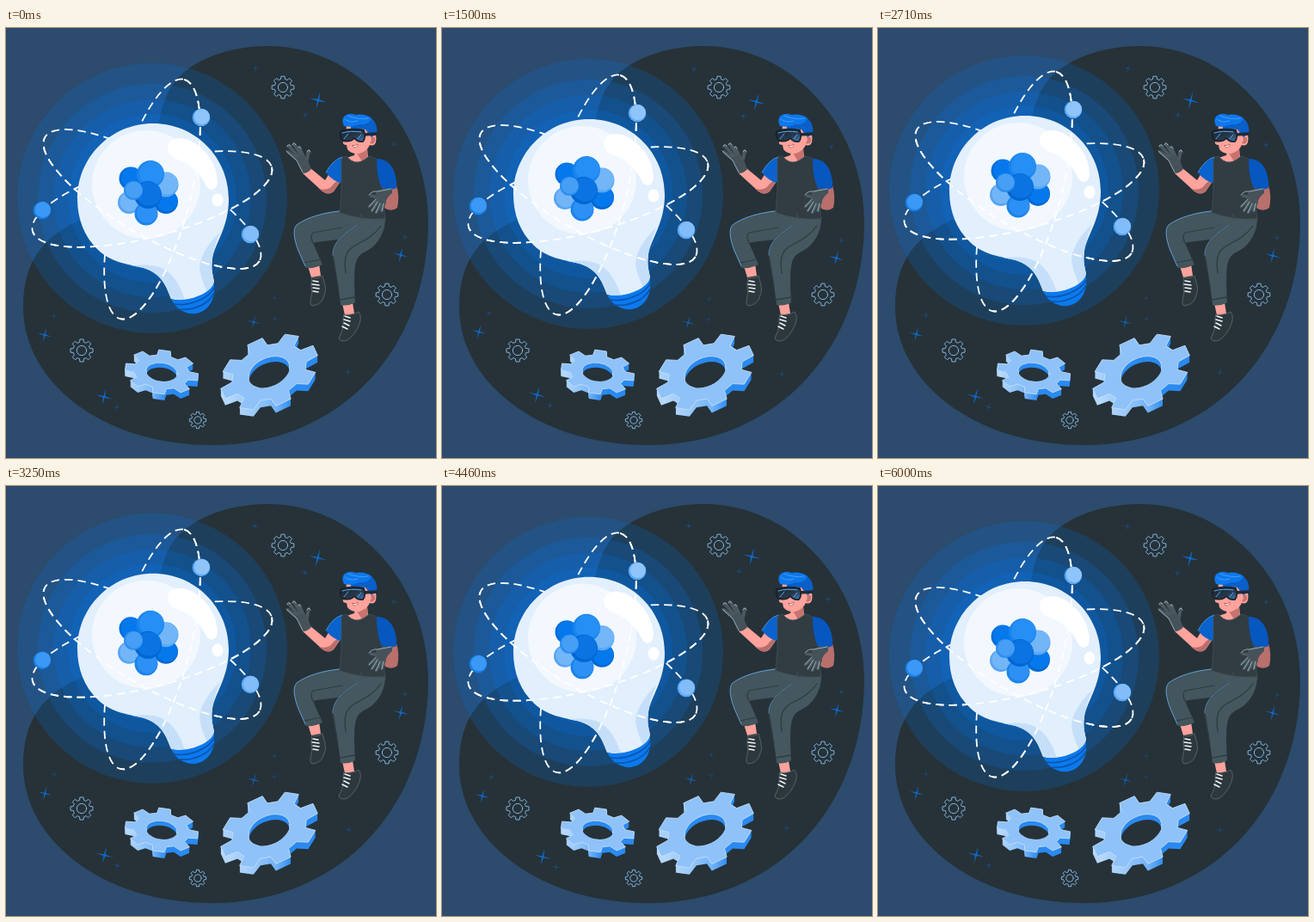
An HTML page for the animation above (6.04 s loop, 500 by 500 pixels).

```html
<!DOCTYPE html>
<html lang="en">
<head>
<meta charset="utf-8">
<title>Idea lab</title>
<style>
html, body { margin: 0; width: 100%; height: 100%; overflow: hidden; background: #2c4b6d; }
svg { display: block; width: 100vw; height: 100vh; }
</style>
</head>
<body>
<svg viewBox="0 0 500 500" fill="none" stroke-linecap="round" stroke-linejoin="round">
  <defs>
    <linearGradient id="side"><stop offset=".05" stop-color="#b5d8fb"/><stop offset=".4" stop-color="#7db9f8"/><stop offset=".6" stop-color="#2a8af0"/></linearGradient>
    <linearGradient id="lens" x2="1" y2="1"><stop stop-color="#16212a"/><stop offset=".6" stop-color="#27394c"/><stop offset="1" stop-color="#3f83c8"/></linearGradient>
  </defs>

  <path fill="#263238" d="M206 52C232 31 267 21 305 21C408 21 491 115 491 225C491 371 391 485 240 485C110 485 20 410 20 325C20 270 45 240 90 222C150 200 172 175 176 130C178 95 186 70 206 52Z"/>

  <g id="stars" fill="#0c6cd2"></g>
  <g id="cogs" stroke="#8cbfee" stroke-width=".9"></g>
  <g id="gears"></g>

  <g id="bulb">
    <g id="glow" fill="#0073e6" fill-opacity=".2"></g>
    <g id="orbits"></g>
    <path fill="#e2effd" d="M171 111C220 111 259 150 259 199C259 232 243 250 240 268C238 282 241 288 242 295C240 310 210 320 192 315C187 302 182 286 160 279C138 274 122 272 107 258C91 243 83 222 83 199C83 150 122 111 171 111Z"/>
    <path fill="#c6dff9" d="M146 276C162 275 176 275 186 282C199 291 204 305 208 316Q199 317 192 315C187 302 182 286 160 279ZM249 237C236 250 225 265 225 280Q227 293 234 307Q241 301 242 295C241 288 238 282 240 268Q241 256 249 237Z"/>
    <circle cx="163" cy="182" r="63" fill="#f3f8fe"/>
    <path fill="#fff" d="M189 135C192 127 205 126 215 131C235 142 245 160 246 178C246 188 238 191 233 184C225 168 215 158 200 153C190 149 186 142 189 135Z"/>
    <ellipse cx="246" cy="200" rx="6.5" ry="7.5" fill="#fff"/>
    <path fill="#0b7aee" d="M192 315C209 320 240 309 242 295V308C240 326 224 336 210 331C202 329 196 323 192 315Z"/>
    <path stroke="#0a55ae" stroke-width="1.700" d="M196 321C212 324 236 315 242 302M201 327C216 329 235 322 241.500 309"/>
    <g id="balls"></g>
    <g id="fronts"></g>
  </g>

  <g id="person">
    <!-- far leg -->
    <path fill="#ffa39c" d="M351 277L364 274L366 288L355 290Z"/>
    <path fill="#2d383d" stroke="#65747a" stroke-width=".7" d="M356 290Q362 292 368 288L371 299Q373 306 369 314Q366 322 356 323Q353 322 354 317Q357 308 355 300Z"/>
    <path stroke="#f2f5f6" stroke-width="1.500" d="M357 294L363 295M356 298L364 299M357 302L364 303M357 306L363 307"/>
    <path fill="#43555d" d="M390 212C370 214 350 220 338 229C333 234 335 246 340 259L349 279Q359 280 368 275L357 250C370 247 382 247 391 245L410 228Z"/>
    <path stroke="#2f3c42" stroke-width="1.200" d="M357 250Q353 243 357 238L391 232M347 273L366 269"/>
    <path stroke="#66a7e4" stroke-width=".9" d="M387 213C369 215 350 220 338 229C333 234 335 246 340 259L348 277"/>
    <!-- near leg -->
    <path fill="#ffa39c" d="M391 320L403 319L405 332L394 334Z"/>
    <path fill="#2d383d" stroke="#65747a" stroke-width=".7" d="M393 333Q402 335 410 330Q414 335 411 344Q406 357 397 363Q388 366 387 360Q393 350 392 341Z"/>
    <path stroke="#f2f5f6" stroke-width="1.500" d="M394 335L400 337M393 339L400 341M393 343L399 346M391 347L397 350"/>
    <path fill="#45575f" d="M388 215L441 221C441 240 430 255 416 261C405 267 404 277 406 319Q398 324 389 322C387 300 382 280 380 264C380 248 396 239 408 229Z"/>
    <path stroke="#2f3c42" stroke-width="1.300" d="M408 229C395 239 380 247 380 264L386 300M388 316L406 313M436 230C422 250 401 250 396 263Q393 270 395 285"/>
    <path stroke="#66a7e4" stroke-width=".7" d="M408 229C395 239 380 247 380 264"/>
    <!-- reaching arm -->
    <path fill="#ffa39c" d="M345 169L354 163L371 177L381 161L394 171L381 190Q375 195 368 190Z"/>
    <path fill="#b96f6c" d="M381 181L392 173L381 190Q375 195 368 190L364 187Q376 190 381 181Z"/>
    <path fill="#0a62cd" d="M391 150Q380 153 372 168Q380 178 389 180L397 158Z"/>
    <path stroke="#4f9ff0" stroke-width=".8" d="M391 150Q380 153 372 168"/>
    <g stroke="#4b585f" stroke-width="4">
      <path d="M340 154L328 144M341 151L329 137M344 149L335 135M347 152L341 139M349 157L352 143"/>
    </g>
    <path fill="#465259" d="M337 151L345 147L351 154L355 164Q351 169 345 169L341 161Z"/>
    <path stroke="#a9c3d5" stroke-width=".8" d="M326 143L338 154L345 168M327 138Q327 134 331 137M333 136Q334 132 337 136M340 139Q341 136 343 140M350 144Q352 140 354 144"/>
    <!-- torso -->
    <path fill="#ffa39c" d="M407 139L420 139L421 151Q408 163 396 151L405 148Z"/>
    <path fill="#c77470" d="M407 144Q414 146 420 139V151L414 155Z"/>
    <path fill="#313d42" stroke="#46535a" stroke-width=".7" d="M396 149Q407 163 422 149Q432 151 437 158L437 190L441 222Q414 224 388 215L390 190L390 152Z"/>
    <path stroke="#465359" d="M388 215Q414 225 441 222M413 217L414 223"/>
    <!-- resting arm -->
    <path fill="#b96f6c" d="M439 181L454 183Q458 196 455 209Q449 214 441 210L437 200Z"/>
    <path fill="#0757c0" d="M431 152Q445 152 451 166Q455 177 454 186Q445 190 437 186Q431 175 431 152Z"/>
    <g stroke="#4b5960" stroke-width="3.500">
      <path d="M433 197L424 195M431 200L423 207M433 202L426 212M437 203L431 214M440 203L437 212"/>
    </g>
    <path fill="#465259" d="M430 191Q439 185 449 187L449 192Q442 197 441 205L431 204Z"/>
    <path stroke="#a9c3d5" stroke-width=".8" d="M422 194Q426 189 432 190L448 187M422 208L430 199M425 213L432 202M430 215L435 204M437 213L439 204"/>
    <!-- head -->
    <path fill="#ffa39c" d="M396 112L426 115Q432 125 430 133Q428 138 423 136Q420 143 411 146Q401 147 397 141L396 136Q391 136 392 132L395 125Z"/>
    <path fill="#c77470" d="M424 127Q430 125 429 132Q427 136 423 134Q426 130 424 127Z"/>
    <path fill="#fff" stroke="#a8474a" stroke-width=".7" d="M403 136.500Q406 138 409 135Q409 139 405 139Z"/>
    <path fill="#0a5fc8" d="M399 103Q417 98 425 105Q433 112 431 123L425 127Q421 123 418 118L401 117Z"/>
    <path fill="#0d78ec" d="M393 114Q389 106 394 102Q400 98 406 101Q417 99 425 105Q422 113 411 112Q402 116 393 114Z"/>
    <path stroke="#55a6f6" stroke-width=".8" d="M394 106Q400 111 409 108M398 102Q409 107 421 105"/>
    <path stroke="#202b31" stroke-width="3.500" d="M416 124L430 123"/>
    <path fill="url(#lens)" stroke="#18232a" stroke-width="1.800" d="M389 120Q402 116 416 119Q419 127 415 132Q409 133 405 128Q401 133 392 131Q387 127 389 120Z"/>
    <path stroke="#60a9eb" d="M391 122Q401 119 413 121M393 129L398 123M409 129L413 124"/>
  </g>
</svg>
<script>
const $ = id => document.getElementById(id);

const polar = (rx, ry, a) => [rx * Math.cos(a), ry * Math.sin(a)].map(v => v.toFixed(2)).join(' ');

// Outline of an eight-toothed wheel, flattened to rx by ry.
function wheel(rx, ry, root) {
  const points = [];
  for (let i = 0; i < 8; i++)
    for (const [da, k] of [[-.25, root], [-.16, 1], [.16, 1], [.25, root]])
      points.push(polar(rx * k, ry * k, i * Math.PI / 4 + da));
  return 'M' + points.join('L') + 'Z';
}

const ring = (rx, ry) => `M${rx} 0A${rx} ${ry} 0 1 0 ${-rx} 0A${rx} ${ry} 0 1 0 ${rx} 0Z`;

const stars = [
  [363, 84, 10.5, 1], [114, 429, 10, 1], [45, 357, 8.5, 1], [459, 264, 9, 1], [288, 342, 8, .8],
  [290, 47, 5, .55], [348, 101, 5.5, .55], [451, 135, 5, .55], [464, 243, 4.5, .6], [312, 314, 4.5, .5],
  [312, 338, 5, .4], [398, 400, 5.5, .5], [56, 335, 5, .5], [129, 441, 5.5, .55]
];
$('stars').innerHTML = stars.map(([x, y, r, o]) => {
  const c = r * .09;
  return `<path opacity="${o}" transform="translate(${x} ${y}) rotate(14)" d="M0 ${-r}L${c} ${-c}L${r} 0L${c} ${c}L0 ${r}L${-c} ${c}L${-r} 0L${-c} ${-c}Z"/>`;
}).join('');

$('cogs').innerHTML = [[322, 69, 13], [443, 310, 13], [88, 375, 13.2], [223, 456, 9.8]].map(([x, y, r]) =>
  `<g transform="translate(${x} ${y})"><path d="${wheel(r, r, .76)}"/><circle r="${r * .43}"/></g>`).join('');

// Thick wheel: stacked side copies under a lighter face.
function gear(x, y, rx, ry, tilt, depth) {
  const d = wheel(rx, ry, .76), hole = ring(rx * .42, ry * .42);
  const at = dy => `transform="translate(${x} ${y + dy}) rotate(${tilt})"`;
  let out = '';
  for (let dy = depth; dy > 0; dy--) out += `<path ${at(dy)} fill="url(#side)" d="${d}"/>`;
  const clip = 'hole' + x;
  return out + `<clipPath id="${clip}"><path ${at(0)} d="${hole}"/></clipPath>
    <path ${at(0)} fill="#8fc2f8" stroke="#c2dffc" stroke-width=".8" d="${d}"/>
    <path ${at(0)} fill="#2a8af0" stroke="#c2dffc" stroke-width=".8" d="${hole}"/>
    <g clip-path="url(#${clip})"><path ${at(depth * .8)} fill="#263238" d="${hole}"/></g>`;
}
$('gears').innerHTML = gear(181, 400, 43, 25.5, 8, 7) + gear(306, 400, 60, 39.5, -25, 8);

$('glow').innerHTML = [157, 133, 115, 98, 84].map(r => `<circle cx="170" cy="198" r="${r}"/>`).join('');

const front = 'M144 0A144 43 0 0 1 -144 0';
const orbit = d => [-75, 30, -15].map(a =>
  `<path transform="translate(170 199) rotate(${a})" stroke="#fff" stroke-width="1.8" stroke-linecap="butt" stroke-dasharray="9.5 6" d="${d}"/>`).join('');
$('orbits').innerHTML = orbit(front + 'A144 43 0 0 1 144 0');

const ball = ([x, y, r, dark, light]) =>
  `<circle cx="${x}" cy="${y}" r="${r}" fill="${dark}"/><circle cx="${x + r * .08}" cy="${y - r * .08}" r="${r * .88}" fill="${light}"/>`;

$('balls').innerHTML = [
  [145, 175, 13.5, '#006ddc', '#0579ec'], [186, 202, 14, '#0068d3', '#0579ec'],
  [143, 203, 13, '#57a5f2', '#73b6f8'], [186, 182, 14.5, '#5ba8f3', '#73b6f8'],
  [163, 216, 13.5, '#1c83ea', '#2c90f4'], [168, 170, 16, '#1a84ec', '#268ff5'],
  [165, 194, 16, '#0067d2', '#0b74e2'], [148, 189, 11, '#2f8fee', '#469ff5']
].map(ball).join('');

$('fronts').innerHTML = orbit(front) + [
  [227, 104, 10.3, '#5ba9f5', '#8fc4fb'], [42, 212, 10.3, '#1a7fe6', '#3b98f5'], [284, 240, 10.3, '#5ba9f5', '#83bdf9']
].map(ball).join('');

function draw(now) {
  const p = Math.min(now % 6040 / 6000, 1);
  const lift = -10 * (1 - Math.abs(2 * p - 1));
  const sway = p < .25 ? 4 * p : p < .75 ? 2 - 4 * p : 4 * p - 4;
  $('bulb').setAttribute('transform', `translate(0 ${lift})`);
  $('stars').setAttribute('transform', `rotate(${sway} 253 244)`);
}

const start = performance.now();
function tick() {
  draw(performance.now() - start);
  requestAnimationFrame(tick);
}
tick();
</script>
</body>
</html>
```
